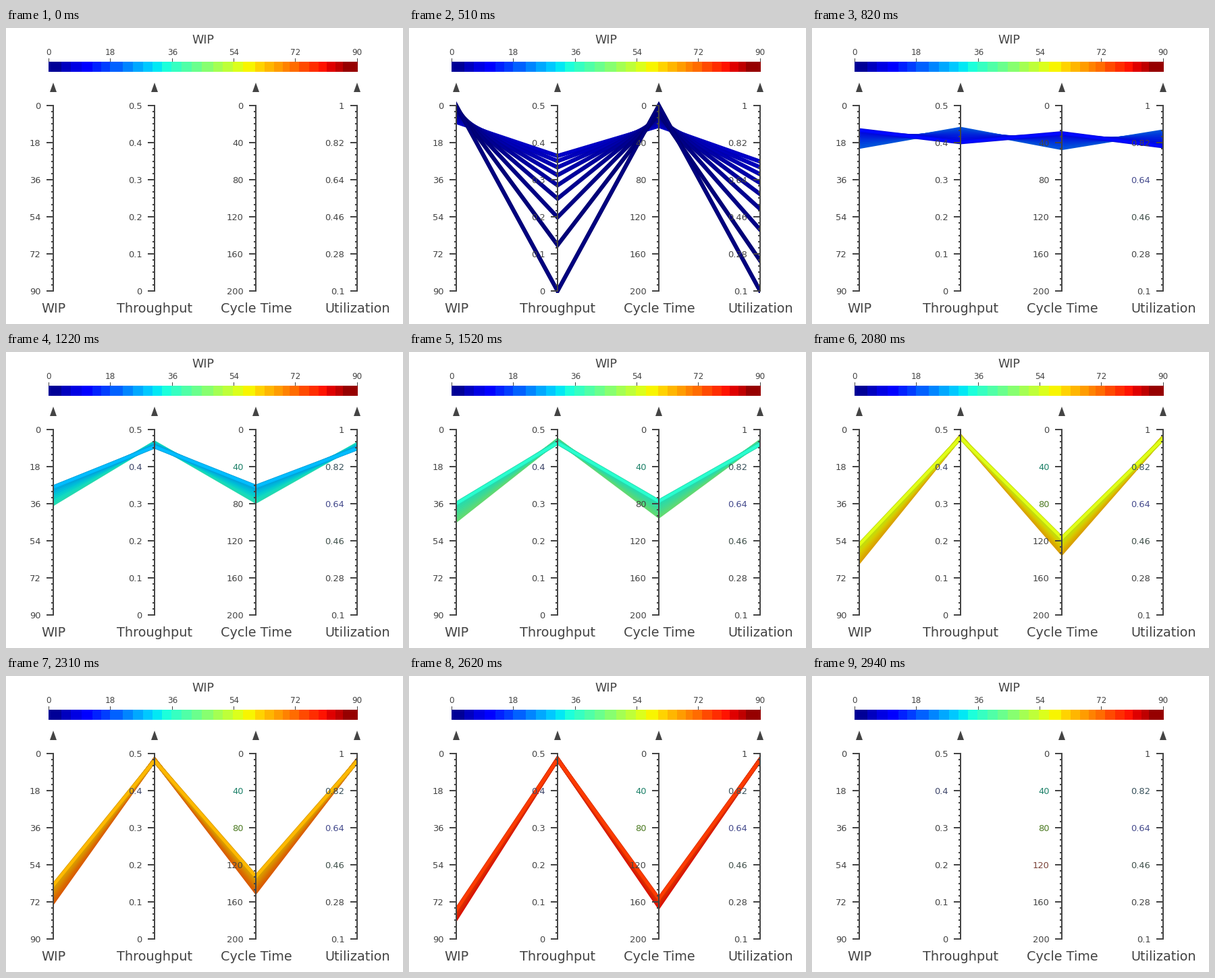
A matplotlib script for the animation above (3.31 s loop, 588 px wide and 439 px high).

```python
import numpy as np
import matplotlib.pyplot as plt
from matplotlib.animation import FuncAnimation
from matplotlib.collections import LineCollection
from matplotlib.patches import Polygon, Rectangle

W, H, DPI = 588, 439, 64  # a power of two keeps the pixel size exact
LOOP, STEP = 3310, 10
INK = "#444444"
PT = 72 / DPI
TOP, BOTTOM = 115, 390
AXES = [
    (70, "WIP", ["0", "18", "36", "54", "72", "90"]),
    (220, "Throughput", ["0.5", "0.4", "0.3", "0.2", "0.1", "0"]),
    (370, "Cycle Time", ["0", "40", "80", "120", "160", "200"]),
    (520, "Utilization", ["1", "0.82", "0.64", "0.46", "0.28", "0.1"]),
]
BAR_EDGES = [63, 82, 96, 112, 128, 141, 154, 173, 188, 203, 217, 231, 245,
             260, 275, 290, 307, 321, 336, 351, 369, 383, 397, 410, 420, 434,
             449, 463, 475, 488, 499, 521]
# (start ms, upper end of the selected WIP window)
WINDOWS = [(510, 8), (590, 12), (670, 16), (820, 20), (900, 27), (1050, 30),
           (1140, 33), (1220, 36), (1370, 40), (1520, 44), (1690, 48),
           (1750, 52), (1920, 56), (2000, 60), (2080, 64), (2230, 68),
           (2310, 72), (2480, 76), (2550, 80), (2620, 84), (2770, 88)]
CLEAR = 2940
SPAN, MAX_WIP = 8, 80
# labels that keep a tint after the band has passed
TINTS = [("0.64", 820, "#444a8c"), ("0.46", 820, "#40504a"),
         ("0.4", 1050, "#3c4468"), ("40", 1050, "#1c8068"),
         ("0.82", 1220, "#37505a"), ("80", 2080, "#4c7a22"),
         ("120", 2770, "#7a4238")]

jet = plt.get_cmap("jet")

fig = plt.figure(figsize=(W / DPI, H / DPI), dpi=DPI, facecolor="white")
ax = fig.add_axes([0, 0, 1, 1])
ax.set_xlim(0, W)
ax.set_ylim(H, 0)
ax.axis("off")


def label(x, y, text, px, ha="center"):
    return ax.text(x, y, text, fontsize=px * PT, family="DejaVu Sans",
                   color=INK, ha=ha, va="baseline", zorder=5)


def rect(x0, y0, x1, y1, color=INK, z=4):
    patch = Rectangle((x0, y0), x1 - x0, y1 - y0, facecolor=color, lw=0,
                      antialiased=False, zorder=z)
    return ax.add_patch(patch)


def draw_bar():
    label(291.5, 23, "WIP", 17.5)
    for x0, x1 in zip(BAR_EDGES, BAR_EDGES[1:]):
        rect(x0, 50, x1, 65, jet(((x0 + x1) / 2 - 63) / 457))
    for i in range(6):
        x = round(63 + 91.3 * i)
        rect(x, 45, x + 1, 50)
        label(x + 0.3, 40, str(18 * i), 12)


def draw_axis(x, name, ticks):
    ax.add_patch(Polygon([(x, 81), (x - 5, 95), (x + 5, 95)],
                         facecolor=INK, lw=0, zorder=4))
    rect(x - 1, TOP - 1, x + 1, BOTTOM + 1)
    for y in np.linspace(TOP, BOTTOM, 31).round():
        rect(x - 3, y - 1, x - 1, y + 1)
    texts = {}
    for y, text in zip(np.linspace(TOP, BOTTOM, 6), ticks):
        y = round(y)
        rect(x - 10, y - 1, x, y + 1)
        texts[text] = label(x - 18.6, y + 4.7, text, 13, "right")
    label(x + 0.5, 422, name, 19.2)
    return texts


def polyline(wip):
    """Path of one record across the four axes."""
    util = wip / (wip + 3.05 - 0.008 * wip)
    cycle = 2 * wip / util if wip else 0
    shares = [wip / 90, 1 - util, cycle / 200, (1 - max(util, 0.1)) / 0.9]
    y = [TOP + s * (BOTTOM - TOP) for s in shares]
    # run past the outer axes, so that the clip cuts the ends upright
    first = y[0] - (y[1] - y[0]) / 10
    last = y[3] + (y[3] - y[2]) / 10
    return list(zip([55, 70, 220, 370, 520, 535], [first, *y, last]))


def shade(wip, k):
    return tuple(k * c for c in jet(wip / 90)[:3])


def band(upper):
    """Strokes of all records in the window, the lowest WIP on top."""
    lower = upper - SPAN
    paths, colors, widths = [], [], []
    for wip in range(min(upper, MAX_WIP), lower - 1, -1):
        front = wip == lower
        path = polyline(wip)
        for width, k in [(6.2, 0.85), (4.4, 1) if front else (2.2, 0.9)]:
            paths.append(path)
            colors.append(shade(wip, k))
            widths.append(width * PT)
    return paths, colors, widths


draw_bar()
tick_texts = {}
for axis in AXES:
    tick_texts.update(draw_axis(*axis))

lines = LineCollection([], zorder=2, joinstyle="miter")
ax.add_collection(lines, autolim=False)
lines.set_clip_path(Rectangle((70, 100), 450, 293, transform=ax.transData))
bands = {upper: band(upper) for _, upper in WINDOWS}


def update(i):
    t = i * STEP
    upper = None
    if t < CLEAR:
        for start, value in WINDOWS:
            if t >= start:
                upper = value
    paths, colors, widths = bands.get(upper, ([], [INK], [1]))
    lines.set_segments(paths)
    lines.set_color(colors)
    lines.set_linewidth(widths)
    for text, start, color in TINTS:
        tick_texts[text].set_color(color if t >= start else INK)
    return [lines]


anim = FuncAnimation(fig, update, frames=LOOP // STEP, interval=STEP,
                     repeat=True, repeat_delay=0)
plt.show()
```
